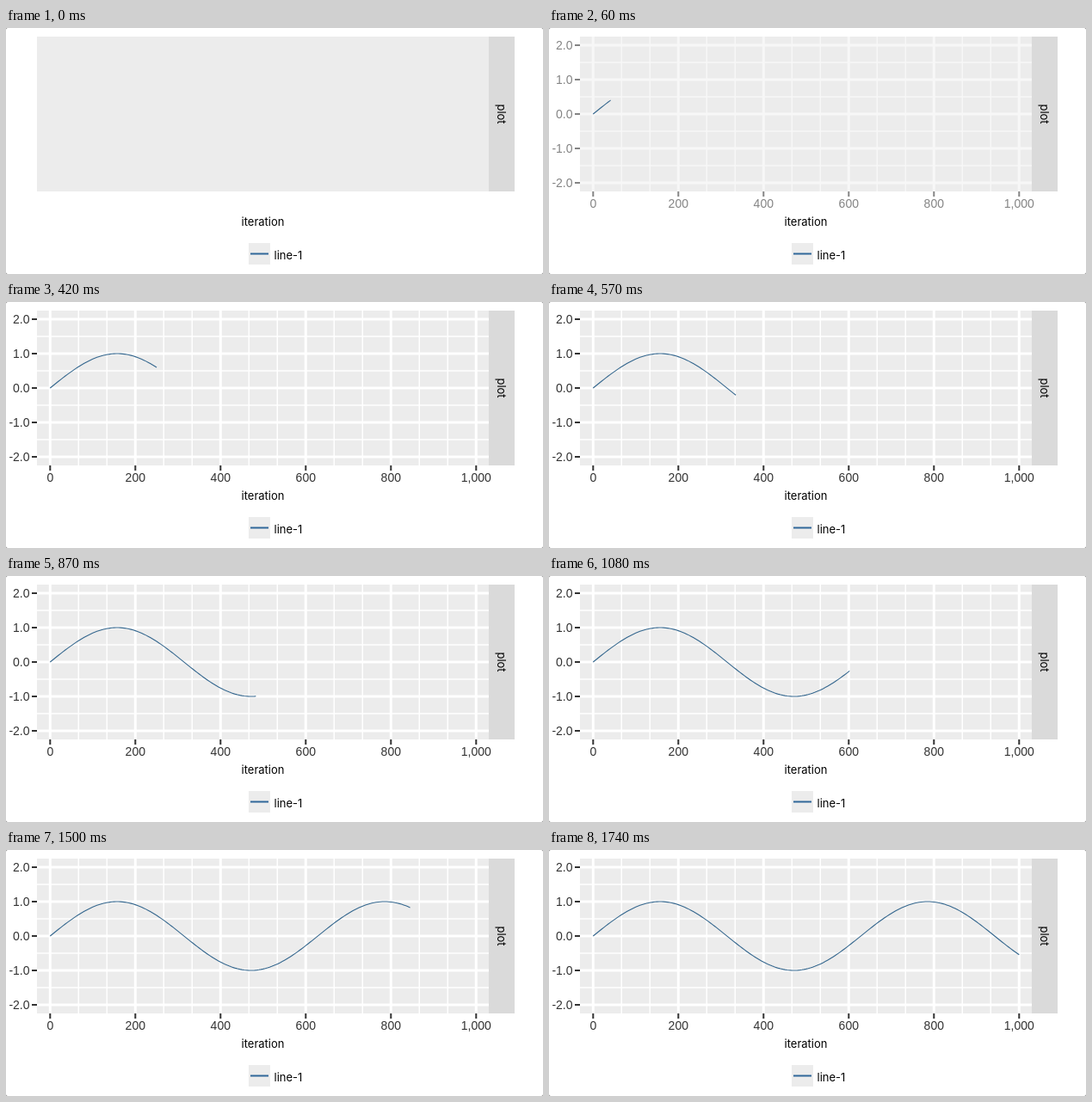
An HTML page that plays this animation: 624x286 px, repeating every 2130 ms.

```html
<!DOCTYPE html>
<html lang="en">
<head>
<meta charset="utf-8">
<title>Growing sine plot</title>
<style>
  html, body { margin: 0; width: 624px; height: 286px; overflow: hidden; background: #777; }
  svg { display: block; background: #fff; border-radius: 2px; }
  text { font: 14px "Liberation Sans", Arial, sans-serif; fill: #333; }
  .title { font: 13px Inter, Roboto, sans-serif; fill: #000; }
  .grid { stroke: #fff; }
  .tick { stroke: #333; stroke-width: 2; }
  .curve { fill: none; stroke: #36688f; stroke-width: 1.1; }
</style>
</head>
<body>
<svg width="624" height="286" viewBox="0 0 624 286">
  <rect x="36" y="10" width="525" height="180" fill="#ececec"/>
  <rect x="561" y="10" width="30" height="180" fill="#dadada"/>
  <g id="axes"></g>
  <path id="curve" class="curve"/>
  <text class="title" text-anchor="middle" transform="translate(570.5 100) rotate(90)">plot</text>
  <text class="title" x="298.5" y="230" text-anchor="middle">iteration</text>
  <rect x="282" y="250" width="25" height="25" fill="#ececec"/>
  <path d="M284 262.5H305" stroke="#2f6699" stroke-width="2"/>
  <text class="title" x="311.5" y="269">line-1</text>
</svg>
<script>
const LOOP = 2130, STEP = 30, FADE = 100;
const axes = document.getElementById("axes");
const curve = document.getElementById("curve");
const px = i => 51.3 + i * 0.495;
const py = v => 100 - v * 40;

// [time in ms, iterations drawn]
const progress = [[0, 0], [60, 41], [270, 165], [570, 335], [870, 483],
  [1080, 602], [1260, 691], [1620, 922], [1740, 1000]];

function iterationsAt(t) {
  const k = progress.findIndex(p => p[0] > t);
  if (k < 0) return 1000;
  const [t0, a] = progress[k - 1], [t1, b] = progress[k];
  return a + (b - a) * (t - t0) / (t1 - t0);
}

const line = (cls, d, width) =>
  `<path class="${cls}" d="${d}"${width ? ` stroke-width="${width}"` : ""}/>`;
const label = (x, y, anchor, s) =>
  `<text x="${x}" y="${y}" text-anchor="${anchor}">${s}</text>`;

function buildAxes() {
  let minor = "", major = "", marks = "";
  for (let k = 0; k <= 15; k++) {
    const x = px(k * 200 / 3), d = `M${x} 10V190`;
    if (k % 3) { minor += line("grid", d, 1.5); continue; }
    major += line("grid", d, 3);
    marks += line("tick", `M${x} 190V196`) +
      label(x, 209, "middle", (k * 200 / 3).toLocaleString("en-US"));
  }
  for (let k = -4; k <= 4; k++) {
    const y = py(k / 2), d = `M36 ${y}H561`;
    if (k % 2) { minor += line("grid", d, 1.5); continue; }
    major += line("grid", d, 3);
    marks += line("tick", `M30 ${y}H36`) +
      label(27.5, y + 5, "end", (k / 2).toFixed(1));
  }
  axes.innerHTML = minor + major + marks;
}

function draw(now) {
  const t = Math.floor(now % LOOP / STEP) * STEP;
  const end = iterationsAt(t);
  let d = "";
  for (let i = 0; i < end; i += 5) d += `L${px(i)} ${py(Math.sin(i / 100))}`;
  if (d) d = "M" + d.slice(1) + `L${px(end)} ${py(Math.sin(end / 100))}`;
  curve.setAttribute("d", d);
  axes.setAttribute("opacity", Math.min(1, t / FADE));
}

buildAxes();
const start = performance.now();
function tick() {
  draw(performance.now() - start);
  requestAnimationFrame(tick);
}
tick();
</script>
</body>
</html>
```
